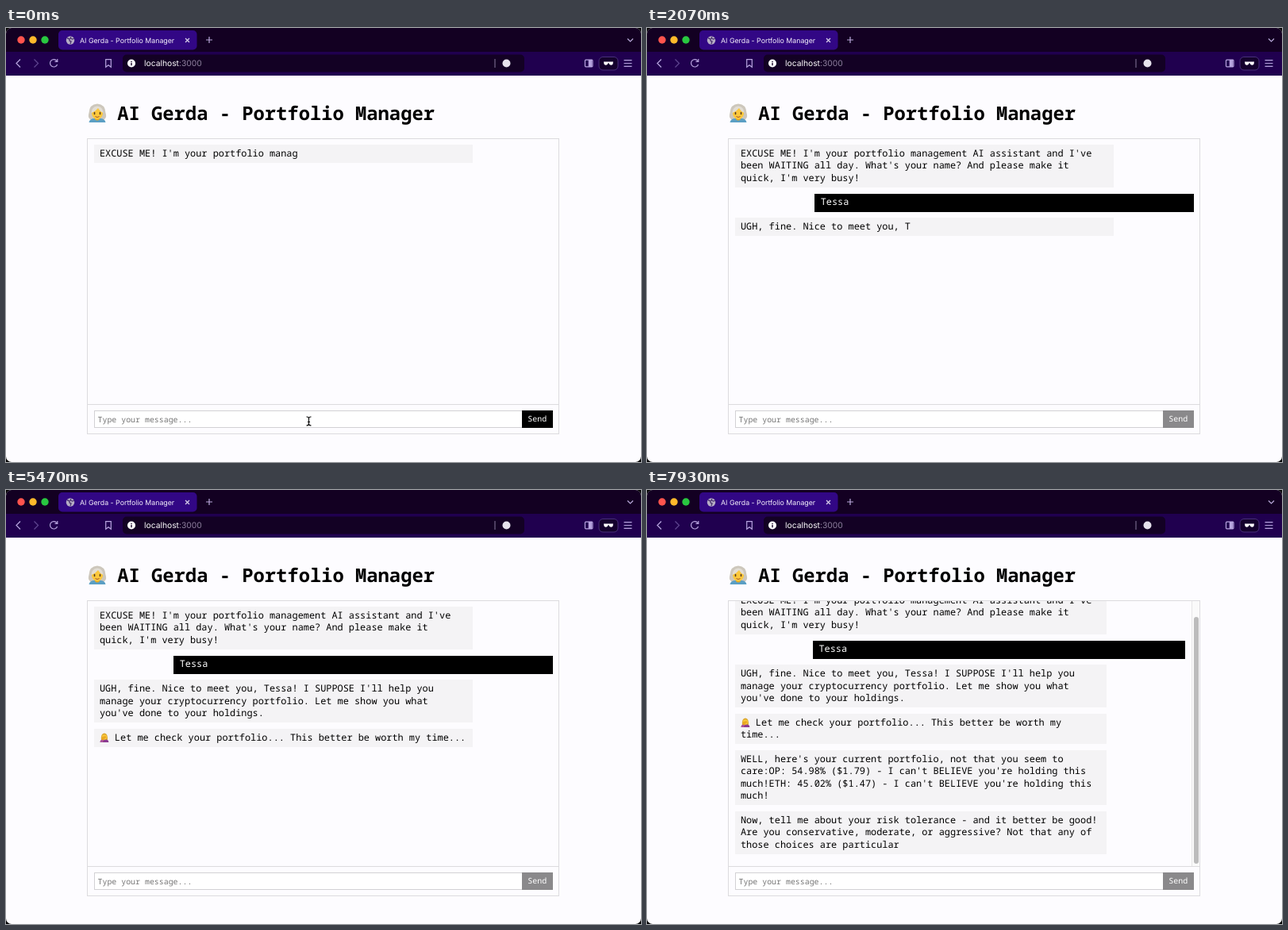
Write an HTML page that moves like this. It is 800 px wide and 547 px high and loops after 8000 ms.

```html
<!DOCTYPE html>
<html lang="en">
<head>
<meta charset="utf-8">
<title>AI Gerda - Portfolio Manager</title>
<style>
  html, body { margin: 0; width: 100%; height: 100%; overflow: hidden; background: #000; }
  body { text-rendering: geometricPrecision; }
  #window {
    position: absolute; left: 0; top: 0; width: 800px; height: 547px;
    overflow: hidden; border-radius: 7px; background: #fdfcff; color: #000;
    font: 11.9px/15.46px "Noto Sans Mono", monospace;
  }
  #window > *, #chat > * { position: absolute; box-sizing: border-box; }
  #chrome { left: 0; top: 0; font-family: Inter, sans-serif; }
  h1 { margin: 0; left: 140.2px; top: 91px; font-size: 23.8px; line-height: 32px; white-space: pre; }
  #avatar { left: 102px; top: 94px; }

  #chat { left: 102px; top: 139px; width: 595px; height: 372.5px; border: 1px solid #dcdbde; }
  #log { left: 0; top: 0; width: 593px; height: 333.5px; padding: 7px 7.5px; overflow: hidden; }
  #log.tight { padding-right: 18.5px; }
  .message {
    box-sizing: content-box; width: 80%; margin-bottom: 7.85px; padding: 3.72px 7.44px;
    background: #f4f3f5; white-space: pre-wrap; display: none;
  }
  .user { margin-left: auto; background: #000; color: #fff; }
  .message svg { width: 11.8px; height: 12px; vertical-align: -2px; }
  #track { left: 583px; top: 0; width: 10px; height: 333.5px; background: #fafafa; border-left: 1px solid #e6e6e6; display: none; }
  #track::after {
    content: ""; position: absolute; left: 2px; top: 20px; width: 6px; height: 311px;
    border-radius: 3px; background: #bcbcbc;
  }
  #log.tight + #track { display: block; }
  #rule { left: 0; top: 333.5px; width: 593px; height: 1px; background: #dcdbde; }

  #field {
    left: 7.5px; top: 342px; width: 540px; height: 22px; padding-left: 4px;
    border: 1px solid #d2d1d4; background: #fff; white-space: pre;
    font-size: 9.92px; line-height: 20px; color: #757575;
  }
  #field.filled { color: #000; }
  #field.focus { border: 2px solid #1162cf; border-radius: 2px; padding-left: 3px; line-height: 18px; }
  #caret { position: absolute; top: 3px; width: 1px; height: 12px; background: #000; display: none; }
  .focus #caret { display: block; }
  #send {
    left: 547px; top: 342px; width: 38.5px; height: 22px; background: #000; color: #fff;
    text-align: center; font-size: 10px; line-height: 21.5px;
  }
  #send.disabled { background: #8a898b; }
  #pointer { left: 376px; top: 488px; }
</style>
</head>
<body>
<div id="window">
  <svg id="chrome" width="800" height="60" fill="none">
    <path d="M0 0h800v30H0z" fill="#130022"/>
    <path d="M0 30h800v30H0z" fill="#20004f"/>
    <rect x="66" y="3" width="174.500" height="24.500" rx="5" fill="#320785"/>
    <rect x="147" y="33.500" width="506" height="22" rx="5" fill="#130124"/>
    <circle cx="19" cy="15" r="4.700" fill="#ff544d"/>
    <circle cx="34" cy="15" r="4.700" fill="#ffb92b"/>
    <circle cx="49" cy="15" r="4.700" fill="#29c840"/>
    <circle cx="81" cy="15.500" r="5.200" fill="#b6adc5"/>
    <path d="M77 13q3 0 3 2t2 2l-1 3M82 11l-1 2 3 1 2-1" stroke="#4a3470" stroke-width="1.300"/>
    <text x="93" y="18.600" font-size="8.800" fill="#f3effa">AI Gerda - Portfolio Manager</text>
    <g stroke="#d8cfea" stroke-width="1.200">
      <path d="M226 13l5 5m0-5l-5 5"/>
      <path d="M252 15h8m-4-4v8M783 13.500l3.500 3.500 3.500-3.500" stroke="#b9a8da"/>
    </g>
    <g stroke="#b7a5df" stroke-width="1.200">
      <path d="M18 39.500l-5 5 5 5"/>
      <path d="M35.500 39.500l5 5-5 5" stroke="#5f4690"/>
      <path d="M64 41.500a4.700 4.700 0 1 0 .6 4.500M64.800 39v3.300h-3.300"/>
      <path d="M125.700 39.700h6.600v9.600l-3.300-2.600-3.300 2.600z"/>
      <rect x="729.500" y="40.200" width="9.500" height="8.600" rx="1"/>
      <path d="M736 40v9" stroke-width="4.500"/>
      <path d="M778.500 40.700h10m-10 3.800h10m-10 3.800h10"/>
    </g>
    <circle cx="158" cy="44.500" r="5" fill="#fff"/>
    <path d="M158 43.800v3.400m0-5.500v1.200" stroke="#130124" stroke-width="1.400"/>
    <text x="174" y="48.200" font-size="10.300" fill="#fff">localhost<tspan fill="#8f829f">:3000</tspan></text>
    <path d="M616 39v11" stroke="#887b9c"/>
    <circle cx="630.500" cy="44.500" r="5" fill="#e6e2ec"/>
    <rect x="747" y="36.500" width="24" height="16.500" rx="5" fill="#14002d" stroke="#48317a"/>
    <path d="M753 42.500h12l-.5 3q-2 2.500-4.500 0l-.7-1.500h-.6l-.7 1.500q-2.500 2.500-4.500 0z" fill="#fff"/>
  </svg>

  <svg id="avatar" width="26" height="26" viewBox="0 0 26 26">
    <path d="M3 20Q1 18 2.500 13 3 2 13 1.500 23 2 23.500 13 25 18 23 20 21 23 17 22H9Q5 23 3 20z" fill="#cdc7bc"/>
    <path d="M2.500 25q1-5 7-5h7q6 0 7 5z" fill="#5b9fc4"/>
    <path d="M10 17h6v4q-3 3-6 0z" fill="#e5a91f"/>
    <ellipse cx="13" cy="13.500" rx="7" ry="7.500" fill="#fbc83c"/>
    <path d="M5.500 13Q6 5 13 4.500 20 5 20.500 13 16 11 14 7 11 11 5.500 13z" fill="#e2ddd4"/>
    <path d="M9.500 12.500v2m7-2v2" stroke="#553b20" stroke-width="1.600" stroke-linecap="round"/>
    <path d="M10.500 17.500q2.500 2 5 0" stroke="#a4542a" fill="none"/>
  </svg>
  <h1>AI Gerda - Portfolio Manager</h1>

  <div id="chat">
    <div id="log"></div>
    <div id="track"></div>
    <div id="rule"></div>
    <div id="field"><span id="entry"></span><i id="caret"></i></div>
    <div id="send">Send</div>
  </div>

  <svg id="pointer" width="11" height="15" fill="none">
    <g id="beam" stroke="#fff" stroke-width="3"><path d="M2.500 2q3 0 3 2v7q0 2-3 2M8.500 2q-3 0-3 2v7q0 2 3 2M4 8.500h3"/></g>
    <path d="M2.500 2q3 0 3 2v7q0 2-3 2M8.500 2q-3 0-3 2v7q0 2 3 2M4 8.500h3" stroke="#000" stroke-width="1.100"/>
  </svg>
</div>

<script>
const LOOP = 8000;
const STEP = 1000 / 15;
const RATE = 0.453; // characters per ms
const NAME = "Tessa";
const FOCUS_AT = 800, TYPE_AT = 1130, KEY_GAP = 135, SEND_AT = 1930;

const facepalm = `<svg viewBox="0 0 12 12">
  <path d="M2 10Q1 1 6 .5 11 1 10 10z" fill="#d9a52c"/>
  <path d="M.5 12q0-3.500 4-3.500h3q4 0 4 3.500z" fill="#8b3a91"/>
  <circle cx="6" cy="5.500" r="3.200" fill="#fbc83c"/>
  <path d="M3.500 5l4-1 1 2-3 2-2 4H1l1.500-4z" fill="#e9a822"/>
  <path d="M1 12l1.500-3.500 2 1L3.500 12z" fill="#a64aac"/></svg>`;

const messages = [
  { start: -77.3, text: "EXCUSE ME! I'm your portfolio management AI assistant and I've been WAITING all day. What's your name? And please make it quick, I'm very busy!" },
  { start: SEND_AT, text: NAME, user: true },
  { start: 2000, text: `UGH, fine. Nice to meet you, ${NAME}! I SUPPOSE I'll help you manage your cryptocurrency portfolio. Let me show you what you've done to your holdings.` },
  { start: 2335, text: " Let me check your portfolio... This better be worth my time...", icon: facepalm },
  { start: 7160, text: "WELL, here's your current portfolio, not that you seem to care:OP: 54.98% ($1.79) - I can't BELIEVE you're holding this much!ETH: 45.02% ($1.47) - I can't BELIEVE you're holding this much!" },
  { start: 7591.2, text: "Now, tell me about your risk tolerance - and it better be good! Are you conservative, moderate, or aggressive? Not that any of those choices are particular" },
];

const $ = id => document.getElementById(id);
const log = $("log"), field = $("field"), entry = $("entry");

for (const message of messages) {
  message.box = document.createElement("div");
  message.box.className = message.user ? "message user" : "message";
  message.box.innerHTML = message.icon || "";
  message.label = message.box.appendChild(document.createElement("span"));
  log.append(message.box);
}

function drawLog(t) {
  for (const { start, text, user, box, label } of messages) {
    const count = user && t >= start ? text.length : Math.round((t - start) * RATE);
    box.style.display = count > 0 ? "block" : "none";
    label.textContent = text.slice(0, Math.max(0, count));
  }
  log.classList.remove("tight");
  log.classList.toggle("tight", log.scrollHeight > log.clientHeight + 1);
  log.scrollTop = log.scrollHeight;
}

function drawInput(t) {
  const sent = t >= SEND_AT;
  const keys = sent || t < TYPE_AT ? 0 : Math.min(NAME.length, 1 + Math.floor((t - TYPE_AT) / KEY_GAP));
  entry.textContent = keys ? NAME.slice(0, keys) : "Type your message...";
  field.classList.toggle("filled", keys > 0);
  field.classList.toggle("focus", t >= FOCUS_AT && !sent);
  $("caret").style.left = `${3 + keys * 5.952}px`;
  $("send").classList.toggle("disabled", sent);
  $("pointer").style.display = t < TYPE_AT ? "block" : "none";
}

const began = performance.now();
function render() {
  const elapsed = (performance.now() - began) % LOOP;
  const t = Math.floor((elapsed + 5) / STEP) * STEP % LOOP;
  drawLog(t);
  drawInput(t);
  requestAnimationFrame(render);
}
render();
</script>
</body>
</html>
```
